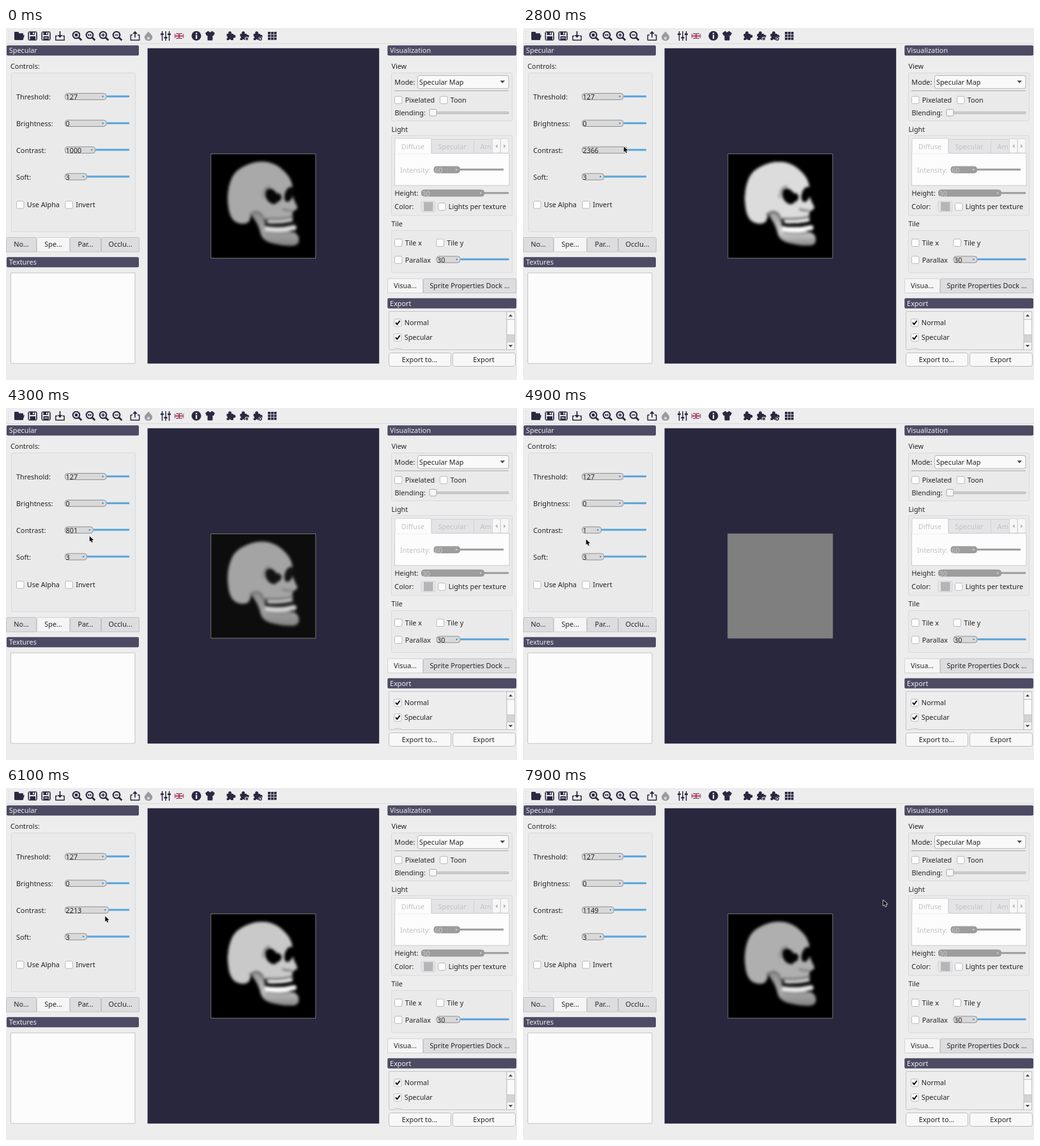
Recreate the animation shown at these times as an HTML page with a canvas. Size 800 by 552 pixels, loop 8000 ms.

```html
<!DOCTYPE html>
<html lang="en">
<head>
<meta charset="utf-8">
<title>Specular map editor</title>
<style>
html, body { margin: 0; width: 800px; height: 552px; overflow: hidden; background: #eeedee; }
canvas { display: block; }
</style>
</head>
<body>
<canvas id="stage" width="800" height="552"></canvas>
<script>
const LOOP = 8000, STEP = 100, LAG = 100;
const INK = '#2b2842', TEXT = '#232325', DIM = '#c2c2c4', PANEL = '#eeedee', EDGE = '#c3c2c5';
const FONT = '10.85px "Noto Sans", "Open Sans", sans-serif';
const MAX = 4000, KNOB = 123, TRAVEL = 69;

let g = document.getElementById('stage').getContext('2d');

// ---------- motion ----------
const clamp = (v, lo, hi) => Math.min(hi, Math.max(lo, v));
const mix = (a, b, k) => a + (b - a) * k;
const easeOut = (k, power) => 1 - (1 - k) ** power;

// Pulled slider value: time, value, ease-out power; it may overshoot the range.
const PULL = [
  [1600, 1000, 1], [2800, 2366, 1], [3400, 4640, 1], [3650, 4680, 1], [4300, 801, 2], [4500, -250, 1],
  [4900, -1060, 1], [5150, -1060, 1], [5800, 905, 2], [6650, 4610, 1], [7100, 4610, 1], [7600, 1149, 2]
];

function pullAt(t) {
  const i = PULL.findIndex(key => key[0] >= t);
  if (i < 0) return PULL[PULL.length - 1][1];
  if (i === 0) return PULL[0][1];
  const [t0, v0] = PULL[i - 1], [t1, v1, power] = PULL[i];
  return mix(v0, v1, easeOut((t - t0) / (t1 - t0), power));
}

const contrastAt = t => Math.round(clamp(pullAt(t), 1, MAX));

function cursorAt(t) {
  if (t < 800) return null;
  if (t < 1600) {
    const k = easeOut((t - 800) / 800, 1.5);
    return [mix(637, 134, k), mix(364, 187, k)];
  }
  if (t > 7600) {
    const k = (t - 7600) / 200, back = Math.max(0, k - 1) * 2;
    return [mix(137, 592, Math.min(1, k)) - 28 * back, mix(200, 165, Math.min(1, k)) + 11 * back];
  }
  const v = pullAt(t);
  const sink = 15 * clamp((t - 3600) / 600, 0, 1) + Math.max(0, -v) / 212;
  return [KNOB - 6 + v * TRAVEL / MAX, 186 + sink];
}

// ---------- drawing helpers ----------
function fill(color) { g.fillStyle = color; g.fill(); }
function stroke(color, w = 1) { g.strokeStyle = color; g.lineWidth = w; g.stroke(); }

function rect(x, y, w, h, color, edge, r = 0) {
  g.beginPath();
  g.roundRect(x, y, w, h, r);
  if (color) fill(color);
  if (edge) stroke(edge);
}

function path(pts) {
  g.beginPath();
  pts.forEach(([x, y]) => g.lineTo(x, y));
}
function poly(pts, color) { path(pts); fill(color); }
function line(pts, color, w) { path(pts); stroke(color, w); }

function oval(x, y, rx, ry, turn, color) {
  g.beginPath();
  g.ellipse(x, y, rx, ry, turn, 0, 7);
  fill(color);
}
const disc = (x, y, r, color) => oval(x, y, r, r, 0, color);

function ring(x, y, r, color, w) {
  g.beginPath();
  g.arc(x, y, r, 0, 7);
  stroke(color, w);
}

// Triangle pointing along (dx, dy)
function arrow(x, y, dx, dy, size, color) {
  poly([[x + dx * size * .55, y + dy * size * .55],
    [x - dx * size * .55 + dy * size, y - dy * size * .55 + dx * size],
    [x - dx * size * .55 - dy * size, y - dy * size * .55 - dx * size]], color);
}

function text(s, x, y, color = TEXT, align = 'left') {
  g.font = FONT;
  g.textAlign = align;
  g.fillStyle = color;
  g.fillText(s, x, y);
}

// ---------- widgets ----------
function titleBar(s, x, y, w) {
  rect(x, y, w, 16, '#4c4b63', null, 2);
  text(s, x + 3.8, y + 12.2, '#f0eff2');
}

function group(x, y, w, h) { rect(x + .5, y + .5, w, h, '#ebeaeb', '#dad9db', 2); }

function check(x, y, s, on) {
  rect(x + .5, y + .5, 11.5, 11.5, '#fdfdfd', '#b9b8bb', 2);
  if (on) line([[x + 3, y + 6], [x + 5.4, y + 8.8], [x + 9.6, y + 3]], '#111', 2);
  text(s, x + 16.7, y + 10.1);
}

function slider(x, end, right, cy, value, off) {
  line([[end, cy], [right, cy]], off ? '#9b9b9c' : '#57a5da', 3);
  rect(x + .5, cy - 4.8, end - x - 1, 10, off ? '#9d9d9e' : '#dad9da', off ? '#929293' : '#8f8f90', 4);
  rect(end - 7, cy - 1, 2.2, 2.2, off ? '#d2d2d3' : '#3b8fc9');
  text(value, x + 1.5, cy + 4.9, off ? '#c4c4c5' : TEXT);
}

function tab(s, x, w, y, on) {
  rect(x + .5, y + .5, w - 1, 22.5, on ? '#f5f5f5' : '#dddcde', on ? '#d2d1d3' : '#c1c0c3', [2, 2, 0, 0]);
  text(s, x + w / 2, y + 15, TEXT, 'center');
}

function button(s, x, y, w, h) {
  rect(x + .5, y + .5, w, h, '#f8f8f8', '#bdbcbf', 3);
  text(s, x + w / 2, y + 14.6, TEXT, 'center');
}

// ---------- toolbar ----------
function floppy(x, label) {
  rect(x + .9, 5.9, 13.4, 13.2, null, INK, 1.5);
  rect(x + 1.5, 6.5, 12.2, 12, null, INK, 1);
  rect(x + 3.5, 6, 7.5, 5, INK);
  rect(x + 8, 7, 1.8, 3, PANEL);
  rect(x + 3.5, 13, 8.5, 6, INK);
  if (label) rect(x + 5, 15, 5.5, 1.3, PANEL);
}

function lens(x, sign) {
  ring(x - 1, 11, 5.3, INK, 2.1);
  line([[x + 3, 15], [x + 7.3, 19.3]], INK, 2.8);
  const inner = { fit: [4.4, 4.4], one: [5, 3], '+': [5.4, 1.5], '-': [5.4, 1.5] }[sign];
  rect(x - 1 - inner[0] / 2, 11 - inner[1] / 2, ...inner, INK);
  if (sign === '+') rect(x - 1.75, 8.3, 1.5, 5.4, INK);
  if (sign === 'one') rect(x - 1.5, 9, 1, 4, PANEL);
}

function puzzle(x, mark) {
  rect(x - 6.5, 9, 10.5, 10, INK, null, 1);
  disc(x - 1.5, 7.8, 2.5, INK);
  disc(x + 5, 13, 2.5, INK);
  disc(x - 6.5, 14.5, 1.5, PANEL);
  disc(x - 1.5, 19, 1.6, PANEL);
  if (!mark) return;
  disc(x + 4, 17, 3.2, PANEL);
  ring(x + 4, 17, mark, INK, 1.5);
}

function flag(x, y, w, h) {
  g.save();
  g.beginPath();
  g.rect(x, y, w, h);
  g.clip();
  rect(x, y, w, h, '#35457d');
  const band = (size, color) => {
    line([[x, y + h / 2], [x + w, y + h / 2]], color, size);
    line([[x + w / 2, y], [x + w / 2, y + h]], color, size);
  };
  line([[x, y], [x + w, y + h]], '#f3eff2', 2);
  line([[x + w, y], [x, y + h]], '#f3eff2', 2);
  band(3.6, '#f3eff2');
  band(2, '#cb3046');
  g.restore();
}

function tray(x, top) { line([[x - 4, top], [x - 6.7, top], [x - 6.7, 19], [x + 6.7, 19], [x + 6.7, top], [x + 4, top]], INK, 1.5); }

function toolbar() {
  rect(0, 24, 800, 1, '#dcdbdd');
  for (let y = 5; y < 20; y += 4) rect(4, y, 1, 1, '#c9c8ca');
  rect(13, 6, 7, 5, INK, null, 1);
  rect(13, 8.3, 14, 10.5, INK, null, 1);
  poly([[16.5, 11.3], [29, 11.3], [26.5, 18.8], [14, 18.8]], INK);
  floppy(34);
  floppy(55, true);
  tray(84.5, 12.5);
  rect(83.6, 5, 1.8, 7, INK);
  arrow(84.5, 13.2, 0, 1, 4, INK);
  ['fit', 'one', '+', '-'].forEach((sign, i) => lens(111 + i * 21, sign));
  tray(202, 11);
  rect(201.2, 7, 1.6, 8, INK);
  arrow(202, 7, 0, -1, 4, INK);
  oval(223, 14.5, 6.2, 5.5, 0, '#9b9aa2');
  arrow(223, 8, 0, -1, 4.5, '#9b9aa2');
  disc(223, 16, 2.2, '#d4d3d8');
  for (let i = 0; i < 3; i++) {
    rect(243.8 + i * 5.5, 5, 1.5, 15, INK);
    rect(242 + i * 5.5, i % 2 ? 14 : 8.5, 5, 2.4, INK);
  }
  flag(263.5, 8, 15, 9);
  disc(298, 12.3, 7.5, INK);
  rect(297, 7.5, 2.2, 2.2, PANEL);
  rect(297, 11, 2.2, 6, PANEL);
  rect(315.5, 5, 8, 14.5, INK, null, 1);
  poly([[316, 5], [323, 5], [327, 8], [325, 12], [314, 12], [312, 8]], INK);
  oval(319.5, 5, 2, 1.5, 0, PANEL);
  [0, 1.4, 2].forEach((mark, i) => puzzle(352 + i * 21, mark));
  for (let i = 0; i < 9; i++) rect(410 + i % 3 * 4.8, 6 + Math.floor(i / 3) * 4.5, 4, 3.7, INK);
}

// ---------- docks ----------
function leftDock(contrast) {
  titleBar('Specular', 1, 27.2, 207);
  text('Controls:', 7, 64.4);
  group(8, 70, 194, 249);
  const rows = [['Threshold:', 127, .5], ['Brightness:', 0, .5], ['Contrast:', contrast, contrast / MAX], ['Soft:', 3, .06]];
  rows.forEach(([name, value, k], i) => {
    const cy = 107.3 + i * 41.9;
    text(name, 16, cy + 4.9);
    slider(92, KNOB + k * TRAVEL, 193, cy, String(value));
  });
  check(16, 271, 'Use Alpha');
  check(92.5, 271, 'Invert');
  tab('No...', 0, 48, 328);
  tab('Par...', 100, 49, 328);
  tab('Occlu...', 149, 60, 328);
  tab('Spe...', 48, 52, 328, true);
  titleBar('Textures', 1, 359.2, 207);
  rect(7.5, 384, 194.5, 142, '#fcfcfc', EDGE, 1);
}

function viewBox() {
  text('View', 603.4, 64.4);
  group(603, 70, 189, 75);
  text('Mode:', 608.3, 88.5);
  rect(644.5, 74.5, 142.5, 20.5, '#f9f9f9', '#b3b2b5', 3);
  text('Specular Map', 647, 88.5);
  arrow(777.3, 84.5, 0, 1, 3.8, '#444446');
  rect(608, 98, 179, 1, '#aaa9ab');
  check(608, 106.7, 'Pixelated');
  check(679, 106.7, 'Toon');
  text('Blending:', 608.4, 137.2);
  rect(668.5, 131.5, 118.5, 3, '#cfcfd0', '#b9b8ba', 1);
  rect(663, 127.5, 11, 10.5, '#f7f7f7', '#a9a8aa', 2);
}

function lightBox() {
  text('Light', 603.4, 162.6);
  group(603, 168, 189, 125.5);
  rect(666.5, 174.5, 66, 22, '#e4e3e5', '#d4d3d5');
  rect(732.5, 174.5, 29, 22, '#e4e3e5', '#d4d3d5');
  rect(608.5, 196.5, 179.5, 50.5, '#fcfcfc', '#cbcacc');
  rect(609, 173, 57, 24, '#fcfcfc', '#d0cfd1', [2, 2, 0, 0]);
  rect(609, 195.5, 57, 2, '#fcfcfc');
  text('Diffuse', 619, 189.8, DIM);
  text('Specular', 676.5, 189.8, DIM);
  text('Am', 742.5, 189.8, DIM);
  [-1, 1].forEach((dir, i) => {
    rect(761.5 + i * 13, 173.5, 12.5, 22.5, '#f7f7f7', '#d6d5d7', 2);
    arrow(767.8 + i * 13, 185.3, dir, 0, 3, '#b3b2b5');
  });
  text('Intensity:', 617, 226.8, DIM);
  slider(669.5, 711, 779, 222, '60', true);
  text('Height:', 608.5, 263.3);
  slider(650, 749, 787, 258.7, '30', true);
  text('Color:', 608.3, 284.2);
  rect(650, 272, 22, 16, '#e6e5e7', '#d0cfd1', 2);
  rect(654, 273, 14.5, 14, '#b5b4b6');
  check(676, 274, 'Lights per texture');
}

function tileBox() {
  text('Tile', 603.2, 311);
  group(603, 317, 189, 66);
  check(608, 330.5, 'Tile x');
  check(673.5, 330.5, 'Tile y');
  check(608, 357.4, 'Parallax');
  slider(673.5, 711.5, 787.5, 362.8, '30');
}

function exportDock() {
  titleBar('Export', 597.3, 423.7, 201.7);
  rect(599.5, 444.5, 197, 60, PANEL, EDGE, 1);
  g.save();
  g.beginPath();
  g.rect(600, 445, 184, 59.5);
  g.clip();
  ['Normal', 'Specular', ''].forEach((s, i) => check(607, 456 + i * 23.2, s, true));
  g.restore();
  rect(784, 445, 12.5, 59.5, '#d4d3d5', EDGE);
  rect(784, 445, 12.5, 12, '#f6f6f6', EDGE);
  rect(784, 457, 12.5, 24, '#fafafa', EDGE);
  rect(784, 492.5, 12.5, 12, '#f6f6f6', EDGE);
  arrow(790, 450.7, 0, -1, 3.2, '#444446');
  arrow(790, 498.8, 0, 1, 3.2, '#444446');
  button('Export to...', 599, 509, 97, 21);
  button('Export', 699, 509, 98, 21);
}

function rightDock() {
  titleBar('Visualization', 597.3, 27.2, 201.7);
  viewBox();
  lightBox();
  tileBox();
  tab('Sprite Properties Dock ...', 653, 146, 392.5);
  tab('Visua...', 597, 56, 392.5, true);
  exportDock();
}

// ---------- skull picture ----------
const BONE = '#a9a9a9', HOLE = '#060606', CREASE = '#6a6a6a';

// Closed curve that rounds off the given corners
function blob(pts, color) {
  const mid = i => {
    const [a, b] = [pts[i % pts.length], pts[(i + 1) % pts.length]];
    return [(a[0] + b[0]) / 2, (a[1] + b[1]) / 2];
  };
  g.beginPath();
  g.moveTo(...mid(pts.length - 1));
  pts.forEach((p, i) => g.quadraticCurveTo(...p, ...mid(i)));
  fill(color);
}

function bend(from, via, to, color, w) {
  g.beginPath();
  g.moveTo(...from);
  g.quadraticCurveTo(...via, ...to);
  stroke(color, w);
}

function makeSkull() {
  const sheet = document.createElement('canvas'), screen = g;
  sheet.width = sheet.height = 204;
  g = sheet.getContext('2d');
  rect(0, 0, 204, 204, '#000');
  g.translate(-301, -177);
  g.lineCap = 'round';

  const jaw = g.createLinearGradient(0, 290, 0, 341);
  jaw.addColorStop(0, '#8d8d8d');
  jaw.addColorStop(.6, '#a2a2a2');
  jaw.addColorStop(1, '#858585');
  blob([[381, 289], [401, 287], [407, 318], [457, 318], [460, 341], [436, 342], [401, 334], [396, 310]], jaw);
  blob([[398, 208], [374, 215], [354, 229], [345, 264], [352, 304], [380, 309], [384, 290], [400, 288],
    [404, 304], [450, 303], [447, 287], [459, 284], [448, 266], [449, 238], [424, 213]], BONE);

  bend([402, 266], [402, 250], [413, 248], '#7d7d7d', 2);
  bend([382, 293], [393, 283], [401, 294], CREASE, 2.4);
  bend([401, 294], [403, 302], [409, 308], CREASE, 2.2);
  oval(416, 264, 9, 13, -.5, HOLE);
  oval(425, 266, 6, 7, .6, HOLE);
  oval(443, 261, 6.5, 12, .3, HOLE);
  bend([433, 284], [439, 287], [447, 286], CREASE, 2);

  // gums, then two rows of teeth
  bend([407, 299], [430, 301], [449, 296], CREASE, 2.5);
  bend([407, 308], [430, 310], [451, 306], '#181818', 4.5);
  bend([411, 304], [430, 305], [447, 301], '#d0d0d0', 4.5);
  bend([409, 315], [430, 318], [451, 313], '#dedede', 7.5);
  bend([408, 321], [432, 325], [453, 320], '#7a7a7a', 1.5);

  g = screen;
  return sheet;
}
const skull = makeSkull();

function picture(k) {
  rect(221.6, 31.7, 362.6, 494.5, '#29273d');
  g.save();
  g.beginPath();
  g.rect(320.5, 197, 164.5, 164);
  g.clip();
  g.filter = `contrast(${k}) blur(2.1px)`;
  g.drawImage(skull, 301, 177);
  g.restore();
  rect(320.8, 197.3, 164, 163.7, null, '#777778');
}

function cursor(x, y) {
  path([[0, 0], [0, 8.6], [2, 6.8], [3.4, 10], [5, 9.3], [3.6, 6.2], [6.4, 6.1]].map(([a, b]) => [x + a, y + b]));
  g.closePath();
  g.lineJoin = 'round';
  stroke('#f4f4f6', 1.4);
  fill('#0c0c10');
}

function draw(t) {
  rect(0, 0, 800, 552, PANEL);
  toolbar();
  leftDock(contrastAt(t));
  rightDock();
  picture(contrastAt(t - LAG) / 1000);
  const tip = cursorAt(t);
  if (tip) cursor(...tip);
}

const start = performance.now();
let shown = -1;
function tick() {
  const t = Math.floor((performance.now() - start) % LOOP / STEP) * STEP;
  if (t !== shown) draw(shown = t);
  requestAnimationFrame(tick);
}
tick();
</script>
</body>
</html>
```
